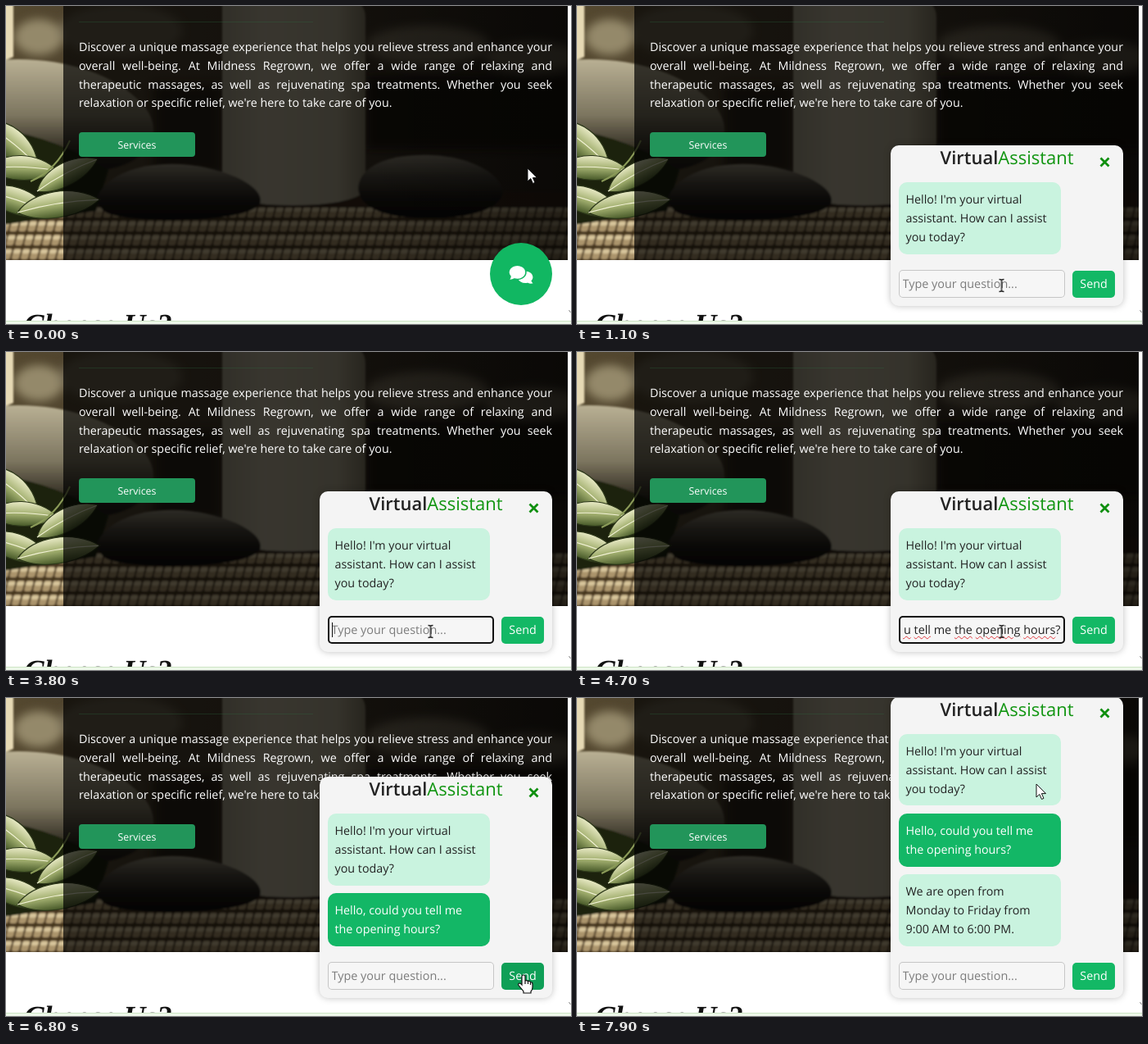
An HTML page for the animation above (8 s loop, 690x388 px).

```html
<!DOCTYPE html>
<html lang="en">
<head>
<meta charset="utf-8">
<title>Virtual assistant</title>
<style>
  * { box-sizing: border-box; }
  html, body { margin: 0; width: 100%; height: 100%; overflow: hidden; background: #fff; }
  #stage {
    position: relative; width: 690px; height: 388px; overflow: hidden;
    font: 14.3px/22.8px "Open Sans", "Noto Sans", sans-serif;
    text-rendering: geometricPrecision; color: #222;
    --loop: 8s step-end infinite;
  }
  #stage svg { position: absolute; display: block; overflow: visible; }

  .intro { position: absolute; left: 89px; top: 40px; width: 578px; margin: 0; color: #fff; }
  .intro span { display: block; text-align: justify; text-align-last: justify; }
  .intro span:last-child { text-align-last: left; }
  .services {
    position: absolute; left: 89px; top: 154px; width: 142px; height: 30px; border-radius: 4px;
    background: #22955a; color: #fff; font-size: 12.4px; line-height: 31px; text-align: center;
  }

  .panel {
    position: absolute; left: 383px; bottom: 22px; width: 284px; padding: 0 9.5px 10px;
    border-radius: 10px; background: #f4f4f4; box-shadow: 0 0 8px rgba(0, 0, 0, .25);
    animation: open var(--loop);
  }
  h1 { margin: 0; height: 45px; font-size: 22px; line-height: 30px; font-weight: 400; text-align: center; white-space: nowrap; color: #119511; }
  h1 b { font-weight: 600; color: #222; }
  .close { left: 255px; top: 13.5px; }

  .msg { width: 198px; padding: 11.2px 9px 8.2px; border-radius: 10px; background: #c9f3df; overflow: hidden; white-space: nowrap; }
  .msg + .msg { margin-top: 9.4px; }
  .mine { background: #13b766; color: #fff; animation: ask var(--loop); }
  .reply { animation: answer var(--loop); }

  .form { position: relative; height: 34px; margin-top: 19px; }
  .field {
    position: absolute; left: 0; top: 0; width: 203px; height: 34px; border-radius: 5px;
    background: #f6f6f6; animation: focus var(--loop);
  }
  .clip { position: absolute; left: 5px; top: 2px; width: 194px; height: 30px; overflow: hidden; font-size: 14.4px; line-height: 32px; white-space: nowrap; }
  .clip span { position: absolute; top: 0; left: 0; }
  .hint { color: #7c7c7c; animation: hint var(--loop); }
  .typed { color: #222; animation: typed var(--loop); }
  .typed u { text-decoration: underline wavy 1px; text-underline-offset: 2px; animation: spell var(--loop); }
  .caret { position: absolute; left: 5px; top: 8px; width: 1px; height: 18px; background: #111; animation: caret var(--loop); }
  .send {
    position: absolute; left: 212.5px; top: .5px; width: 52px; height: 33px; border-radius: 5px;
    background: #13b865; color: #fff; line-height: 34px; text-align: center; animation: hover var(--loop);
  }

  .pointer { position: absolute; left: 0; top: 0; animation: move 8s ease-in-out infinite; }
  .arrow { animation: arrow var(--loop); }
  .hand { animation: hand var(--loop); }
  .beam { animation: beam var(--loop); }

  @keyframes open { 0% { visibility: hidden; } 8.75% { visibility: visible; } }
  @keyframes ask {
    0% { max-height: 0; margin-top: 0; padding-top: 0; padding-bottom: 0; }
    83.75% { max-height: 65px; margin-top: 9.4px; padding-top: 11.2px; padding-bottom: 8.2px; }
  }
  @keyframes answer {
    0% { max-height: 0; margin-top: 0; padding-top: 0; padding-bottom: 0; }
    88.75% { max-height: 88px; margin-top: 9.4px; padding-top: 11.2px; padding-bottom: 8.2px; }
  }
  @keyframes focus {
    0%, 80% { box-shadow: inset 0 0 0 1px #c6c6c6; }
    22.5% { box-shadow: inset 0 0 0 2px #111; }
  }
  @keyframes hint { 0%, 83.75% { opacity: 1; } 51.25% { opacity: 0; } }
  @keyframes typed {
    0%, 83.75% { opacity: 0; left: 0; transform: none; }
    51.25% { opacity: 1; left: 193px; transform: translateX(-100%); }
    80% { opacity: 1; left: 0; transform: none; }
  }
  @keyframes spell { 0% { text-decoration-color: transparent; } 55% { text-decoration-color: #e0383e; } }
  @keyframes caret {
    0%, 28.75%, 41.25% { opacity: 0; left: 5px; }
    22.5%, 35%, 47.5% { opacity: 1; left: 5px; }
    51.25%, 65%, 77.5% { opacity: 1; left: 198px; }
    58.75%, 71.25%, 80% { opacity: 0; left: 198px; }
  }
  @keyframes hover { 0%, 10%, 94.5% { background: #13b865; } 8.75%, 69.2% { background: #0f9f57; } }
  @keyframes move {
    0% { transform: translate(637px, 198px); }
    5%, 8.75% { transform: translate(630px, 328px); }
    13.75%, 62.5% { transform: translate(518.5px, 341px); }
    72.5%, 93.75% { transform: translate(632px, 338px); }
    98.75%, 100% { transform: translate(561px, 105px); }
  }
  @keyframes arrow { 0%, 68.5%, 94.5% { opacity: 1; } 3%, 69.2% { opacity: 0; } }
  @keyframes hand { 0%, 10%, 94.5% { opacity: 0; } 3%, 69.2% { opacity: 1; } }
  @keyframes beam { 0%, 68.5% { opacity: 0; } 10% { opacity: 1; } }
</style>
</head>
<body>
<div id="stage">
  <svg width="690" height="388" viewBox="0 0 690 388">
    <defs>
      <linearGradient id="wall" x2="1"><stop stop-color="#54482f"/><stop offset=".35" stop-color="#4a3f2e"/><stop offset="1" stop-color="#30281d"/></linearGradient>
      <linearGradient id="wax" x2="1"><stop stop-color="#a69f88"/><stop offset=".3" stop-color="#bdb59d"/><stop offset=".8" stop-color="#b3ab92"/><stop offset="1" stop-color="#857d66"/></linearGradient>
      <linearGradient id="rock" x2="0" y2="1"><stop stop-color="#b9b094"/><stop offset=".45" stop-color="#7d7660"/><stop offset=".75" stop-color="#2e291f"/><stop offset="1" stop-color="#15110c"/></linearGradient>
      <linearGradient id="pebble" x2="0" y2="1"><stop stop-color="#97907c"/><stop offset=".35" stop-color="#4c463b"/><stop offset=".7" stop-color="#1c1813"/><stop offset="1" stop-color="#0a0806"/></linearGradient>
      <linearGradient id="green" x2="0" y2="1"><stop stop-color="#e9eac6"/><stop offset=".5" stop-color="#a3b070"/><stop offset="1" stop-color="#465828"/></linearGradient>
      <linearGradient id="fade" x2="1"><stop offset=".6" stop-color="#000" stop-opacity="0"/><stop offset="1" stop-color="#000" stop-opacity=".3"/></linearGradient>
      <pattern id="mat" width="11" height="17" patternUnits="userSpaceOnUse" patternTransform="translate(0 243) skewX(-14)">
        <rect width="11" height="17" fill="#45341f"/>
        <rect x="1" y="2" width="9" height="13" rx="2" fill="#ab946c"/>
        <rect x="1" y="3" width="9" height="5" rx="2" fill="#d8c69c"/>
      </pattern>
      <filter id="soft"><feGaussianBlur stdDeviation="1"/></filter>
      <filter id="haze"><feGaussianBlur stdDeviation="6"/></filter>
      <clipPath id="photo"><path d="M0 0H686V310H0Z"/></clipPath>
      <g id="leaf">
        <path d="M0 0C22-30 72-30 100 0C70 24 24 22 0 0" fill="url(#green)" stroke="#2c3719" stroke-width="1.5"/>
        <path d="M0 0Q50-8 98 0" fill="none" stroke="#f2f2d6" stroke-width="1.5"/>
      </g>
    </defs>
    <g clip-path="url(#photo)">
      <rect width="686" height="310" fill="url(#wall)"/>
      <g filter="url(#haze)">
        <ellipse cx="40" cy="38" rx="30" ry="22" fill="#94896a"/>
        <ellipse cx="140" cy="30" rx="75" ry="32" fill="#6d6450"/>
        <ellipse cx="515" cy="48" rx="75" ry="24" fill="#7a705a"/>
        <ellipse cx="645" cy="62" rx="60" ry="18" fill="#7a705a"/>
        <path d="M440 85H700V175H440Z" fill="#1d1710"/>
        <path d="M180 95H264V205H180Z" fill="#2b2318"/>
      </g>
      <g filter="url(#soft)">
        <path d="M-5-5H9V62L-5 68Z" fill="#e6d9b4"/>
        <rect x="-5" y="238" width="700" height="80" fill="url(#mat)"/>
        <path d="M-5 226H695V246H-5Z" fill="#3a2c1c"/>
        <path d="M264-5H430Q439 2 439 14V226Q420 243 350 243Q280 243 264 226Z" fill="url(#wax)"/>
        <path d="M-10 66C60 60 130 80 165 118C195 150 180 190 120 200L-10 215Z" fill="url(#rock)"/>
        <path d="M-10 150Q60 160 125 200L110 250L-10 268Z" fill="#1c2211"/>
        <path d="M112 232C125 202 175 188 225 194C275 200 318 222 310 242C290 266 150 266 122 252Q110 244 112 232Z" fill="url(#pebble)"/>
        <path d="M430 222C432 194 470 180 520 182C570 184 606 206 607 228C600 256 540 262 490 258Q432 252 430 222Z" fill="url(#pebble)"/>
      </g>
      <use href="#leaf" transform="translate(-30 142) rotate(38) scale(.88 .9)"/>
      <use href="#leaf" transform="translate(-22 198) rotate(2) scale(.85 .75)"/>
      <use href="#leaf" transform="translate(38 226) rotate(-28) scale(.84 .7)"/>
      <use href="#leaf" transform="translate(-30 226) rotate(18) scale(.9 .8)"/>
      <use href="#leaf" transform="translate(14 252) rotate(-9) scale(1.02 .8)"/>
      <path d="M30 214Q62 200 78 164" fill="none" stroke="#8a9a58" stroke-width="2"/>
      <rect x="70" width="616" height="310" opacity=".7"/>
      <rect x="70" width="616" height="310" fill="url(#fade)"/>
      <path d="M89 19.5H375" stroke="#2c6a40" stroke-opacity=".3"/>
    </g>
    <text x="22" y="401" font-family="'Liberation Serif', serif" font-size="36.8" font-weight="700" font-style="italic" fill="#111">Choose Us?</text>
    <path d="M0 384H690V388H0Z" fill="#eef8ea"/>
    <path d="M0 384.5H690" stroke="#cde4c4"/>
    <path d="M687.5 371L689.5 374" stroke="#888"/>
    <circle cx="629" cy="327" r="38" fill="#11b762"/>
    <g fill="#fff" stroke="#11b762" stroke-width="1.6">
      <path d="M644.5 338.5Q643 337 642.3 335.5A10 8 0 1 0 637 338.5Q641 340.5 644.5 338.5Z"/>
      <path d="M614 334.5Q616 332 616 330A10.5 8.6 0 1 1 621 333Q618 335 614 334.5Z"/>
    </g>
  </svg>

  <p class="intro">
    <span>Discover a unique massage experience that helps you relieve stress and enhance your</span>
    <span>overall well-being. At Mildness Regrown, we offer a wide range of relaxing and</span>
    <span>therapeutic massages, as well as rejuvenating spa treatments. Whether you seek</span>
    <span>relaxation or specific relief, we're here to take care of you.</span>
  </p>
  <div class="services">Services</div>

  <div class="panel">
    <h1><b>Virtual</b>Assistant</h1>
    <svg class="close" width="13" height="13"><path d="M1.5 1.5L11.5 11.5M11.5 1.5L1.5 11.5" stroke="#0f8f0f" stroke-width="2.8"/></svg>
    <div class="msg">Hello! I'm your virtual<br>assistant. How can I assist<br>you today?</div>
    <div class="msg mine">Hello, could you tell me<br>the opening hours?</div>
    <div class="msg reply">We are open from<br>Monday to Friday from<br>9:00 AM to 6:00 PM.</div>
    <div class="form">
      <div class="field">
        <div class="clip">
          <span class="hint">Type your question...</span>
          <span class="typed"><u>Hello</u>, <u>could</u> <u>you</u> <u>tell</u> me <u>the</u> <u>opening</u> <u>hours</u>?</span>
        </div>
        <div class="caret"></div>
      </div>
      <div class="send">Send</div>
    </div>
  </div>

  <svg class="pointer" width="1" height="1">
    <path class="arrow" d="M0 0V16L3.8 12.5L6.5 18.5L9 17.4L6.4 11.6H11.5Z" fill="#fff" stroke="#111"/>
    <path class="hand" d="M-2 1.5Q-2 0 0 0Q2 0 2 1.5V7Q4 6 5.5 7.5Q7.5 7 8.5 8.5Q11 8.5 11 11V15Q11 18 9 20V22H0V20L-6 12.5Q-7 10.5-5 10Q-3.5 10-2 12ZM2 7V11M5.5 8V11M8.5 9V12" fill="#fff" stroke="#111" stroke-width="1.2"/>
    <path class="beam" d="M-3-7.5Q0-7.5 0-6Q0-7.5 3-7.5M0-6V6M-3 7.5Q0 7.5 0 6Q0 7.5 3 7.5" fill="none" stroke="#222" stroke-width="1.4"/>
  </svg>
</div>
</body>
</html>
```
